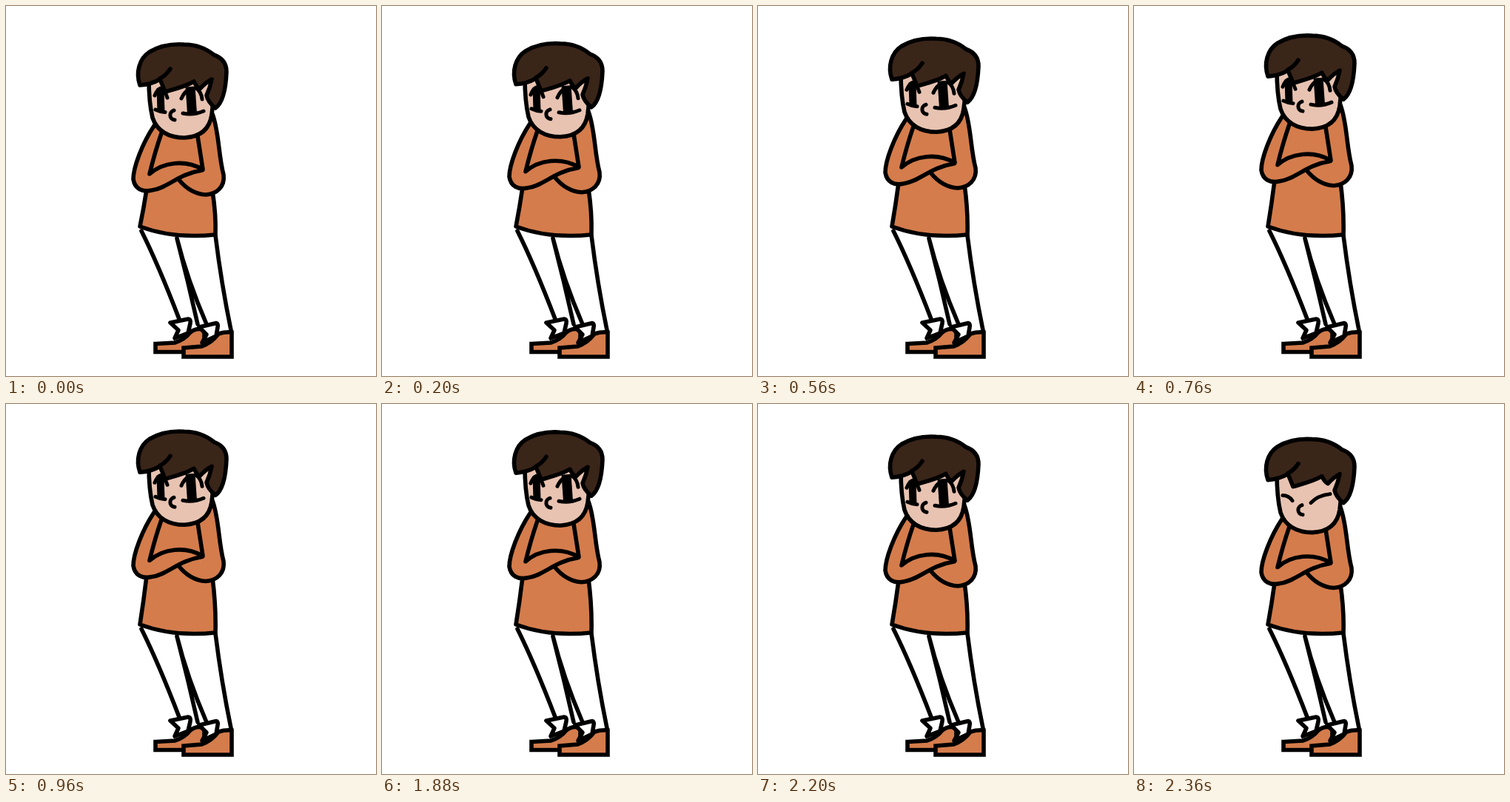
These frames come from a looping animation (500 px wide and 500 px high, 2.4 s). An HTML page:

```html
<!DOCTYPE html>
<html lang="en">
<head>
<meta charset="utf-8">
<title>Breathing figure</title>
<style>
  html, body { margin: 0; width: 100%; height: 100%; overflow: hidden; background: #fff; }
  svg { display: block; width: 100%; height: 100%; }
  path { fill: none; stroke: #000; stroke-width: 5.6; stroke-linecap: round; stroke-linejoin: round; }
  .white { fill: #fff; }
  .cloth { fill: #d47c4c; }
  .skin { fill: #e8c3b2; }
  .hair { fill: #3a2519; }
  .plain { stroke: none; }
  .shoe { stroke-linejoin: miter; }
  .fine { stroke-width: 5; }
  .eye { stroke-linecap: butt; }
</style>
</head>
<body>
<svg viewBox="0 0 500 500">
  <g id="legs">
    <path d="M183 304Q206 350 234 423M231 314Q246 372 259 430M231 314Q245 370 271 430M283 310Q291 375 304 438"/>
    <path class="cloth shoe" d="M202 456.500L228 455Q241 451 249 441Q258 434 268 438L268 467.500L202 467.500Z"/>
    <path class="white" d="M222 428L246 423Q250 423 249 429L246 442L228 449L233 438Z"/>
    <path class="cloth shoe" d="M240 462L264 460Q278 455 287 443Q296 440 305 441L305 474L240 474Z"/>
    <path class="white" d="M261 434L284 428.500Q287 429 286 434L284 446L265 455L271 444Z"/>
  </g>

  <path id="torso" class="cloth"/>

  <g id="arms">
    <path class="cloth plain" d="M200 162C184 186 172 218 172 234C174 247 184 252 197 249L268 255C285 254 296 244 294 228C289 205 288 170 279 146Z"/>
    <path d="M200 162C184 186 172 218 172 234C174 247 184 252 197 249C219 246 232 227 265 222"/>
    <path d="M210 172Q201 198 194 227C212 211 242 207 266 221L259 176"/>
    <path d="M279 146C288 170 287 202 294 228C296 244 285 254 270 255C253 254 241 244 233 234"/>
  </g>

  <g id="head">
    <path class="skin" d="M193 98Q193 130 198 151C204 169 220 178 241 178C262 177 275 167 278 147L283 100Z"/>
    <path class="fine" d="M227 141C220 143 220 153 228 154"/>
    <g id="open">
      <path class="fine" d="M201 121Q204 113 209 111Q215 114 218 124M202 140Q208 143 215 143.500"/>
      <path class="eye" d="M208.500 111L209.500 142" style="stroke-width:10"/>
      <path class="fine" d="M237 125Q241 116 247 113M257 111Q264 116 265 126M239 145Q253 148 267 142"/>
      <path class="eye" d="M249 109L251.500 145" style="stroke-width:13"/>
    </g>
    <path id="closed" class="fine" d="M201 128Q209 128 214 135M239 138Q248 128 265 126"/>

    <path class="hair" d="M181 107C175 90 180 71 194 62C209 53 227 51 241 52C258 52 271 58 281 66C292 70 298 77 298 89C297 114 293 131 283 138Q273 130 271 121Q276 110 278 99Q269 104 262 112Q257 109 254 102C242 109 229 112 215 116Q211 106 208 99Q196 106 181 107Z"/>
    <path d="M208 98Q216 94 222 85"/>
  </g>
</svg>
<script>
  const STEP = 40, LOOP = 2400, HOLD_FROM = 960, HOLD_TO = 1880, MIRROR = 2760, BLINK = 2320;
  const get = id => document.getElementById(id);
  const torso = get('torso'), arms = get('arms'), head = get('head');
  const open = get('open'), closed = get('closed');

  const raise = (part, by) => part.setAttribute('transform', `translate(0 ${-by})`);
  const show = (part, on) => part.style.display = on ? '' : 'none';

  function draw(now) {
    const t = Math.floor(now % LOOP / STEP) * STEP;
    // Inhale, hold, then exhale along the same curve until the loop cuts it off.
    const breath = t < HOLD_TO ? Math.min(t, HOLD_FROM) : MIRROR - t;
    const armLift = 15.5 * breath / HOLD_FROM;
    const headLift = 15.5 * (1 - Math.cos(Math.PI * breath / 1120)) / 2;

    raise(arms, armLift);
    raise(head, headLift);
    // The hem stays put while the sides stretch up to the arms.
    torso.setAttribute('d',
      `M190 ${248 - armLift}Q186 ${274 - armLift / 2} 181 298Q226 315 283 309Q284 ${282 - armLift / 2} 279 ${250 - armLift}`);
    show(open, t < BLINK);
    show(closed, t >= BLINK);
  }

  let start;
  function tick(now) {
    start ??= now;
    draw(now - start);
    requestAnimationFrame(tick);
  }
  draw(0);
  requestAnimationFrame(tick);
</script>
</body>
</html>
```
